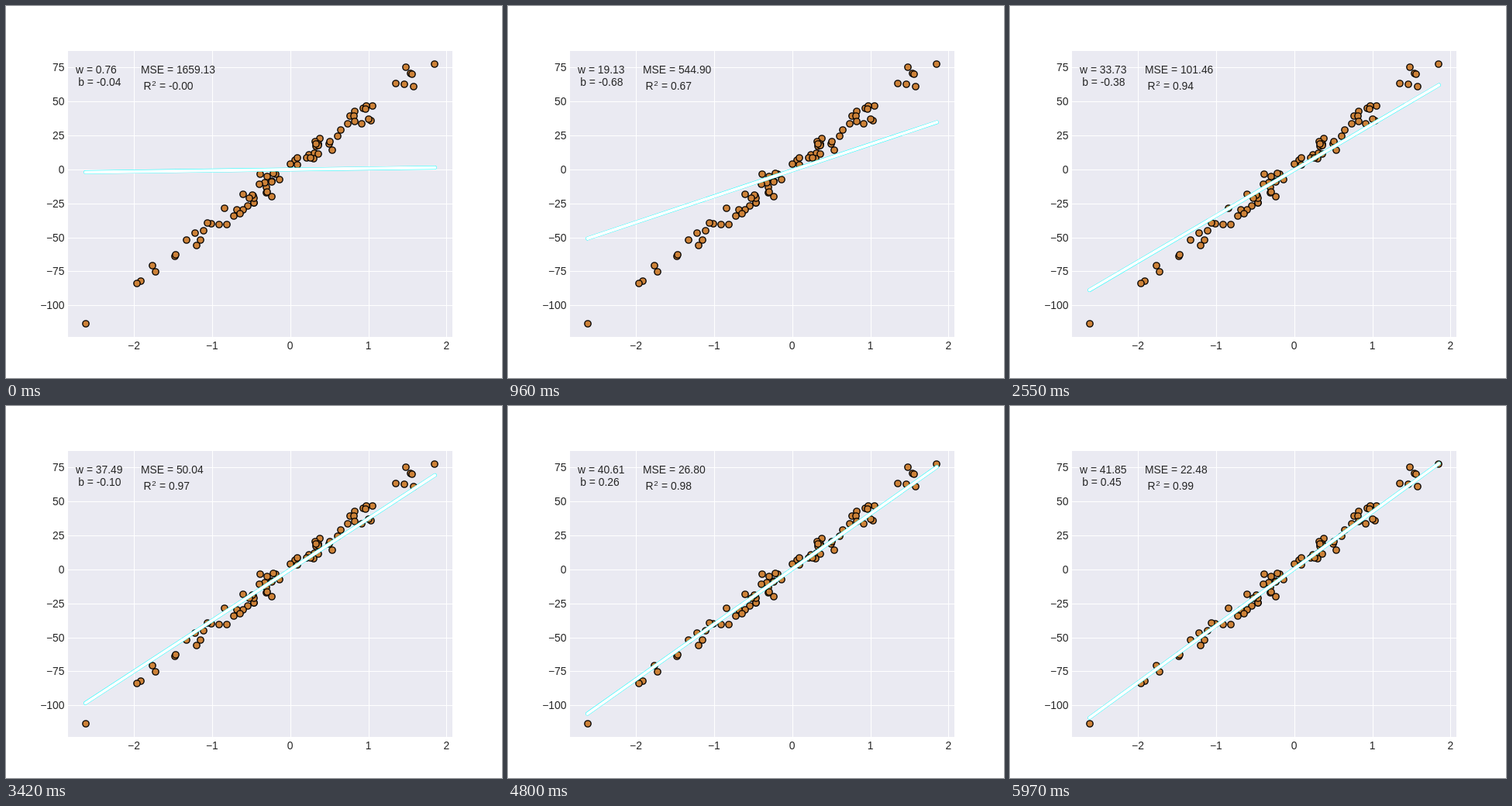
Animation of 640 by 480 pixels, one loop 6 s. Source, as an HTML page:

```html
<!DOCTYPE html>
<html lang="en">
<head>
<meta charset="utf-8">
<title>Linear regression by gradient descent</title>
<style>
  html, body { margin: 0; width: 100%; height: 100%; overflow: hidden; background: #fff; }
  svg { display: block; width: 640px; height: 480px; }
  text { font: 13.89px "Liberation Sans", Arial, sans-serif; fill: #262626; }
  #grid path { stroke: #fff; }
  #dots circle { fill: #cd8238; stroke: #000; stroke-width: 1.39; }
  .fit { stroke-linecap: round; }
</style>
</head>
<body>
<svg viewBox="0 0 640 480">
  <rect x="80" y="58" width="496" height="369" fill="#eaeaf2"/>
  <g id="grid"></g>
  <g id="dots"></g>
  <line class="fit" stroke="#0ff" stroke-width="4.8"/>
  <line class="fit" stroke="#fff" stroke-width="4"/>
  <text id="w" x="90" y="87"></text>
  <text id="b" x="93.2" y="103"></text>
  <text id="mse" x="174" y="87"></text>
  <text x="177.4" y="108">R</text>
  <text x="188.2" y="103" style="font-size:9.72px">2</text>
  <text id="r2" x="198" y="108"></text>
</svg>
<script>
const $ = id => document.getElementById(id);
const X = x => 366.69 + 100.83 * x;
const Y = y => 210.9 - 1.754 * y;
const crisp = v => Math.round(v) + 0.5;
const label = v => String(v).replace('-', '\u2212');

let grid = '';
for (let x = -2; x <= 2; x++)
  grid += `<path d="M${crisp(X(x))} 58V427"/><text x="${X(x)}" y="443" text-anchor="middle">${label(x)}</text>`;
for (let y = -100; y <= 75; y += 25)
  grid += `<path d="M80 ${crisp(Y(y))}H576"/><text x="75.5" y="${Math.round(Y(y) + 5)}" text-anchor="end">${label(y)}</text>`;
$('grid').innerHTML = grid;

// Mersenne Twister, returning uniform numbers in [0, 1)
function twister(seed) {
  const N = 624, s = new Uint32Array(N);
  s[0] = seed;
  for (let i = 1; i < N; i++)
    s[i] = Math.imul(1812433253, s[i - 1] ^ (s[i - 1] >>> 30)) + i;
  let at = 0;
  function word() {
    const next = (at + 1) % N;
    const mix = (s[at] & 0x80000000) | (s[next] & 0x7fffffff);
    let y = s[at] = s[(at + 397) % N] ^ (mix >>> 1) ^ (mix & 1 ? 0x9908b0df : 0);
    at = next;
    y ^= y >>> 11;
    y ^= (y << 7) & 0x9d2c5680;
    y ^= (y << 15) & 0xefc60000;
    return (y ^ (y >>> 18)) >>> 0;
  }
  return () => {
    const high = word() >>> 5, low = word() >>> 6;
    return (high * 2 ** 26 + low) / 2 ** 53;
  };
}

// Normal deviates in pairs, by the polar method
function normals(count, random) {
  const out = [];
  while (out.length < count) {
    const u = 2 * random() - 1, v = 2 * random() - 1, r = u * u + v * v;
    if (r >= 1 || r === 0) continue;
    const f = Math.sqrt(-2 * Math.log(r) / r);
    out.push(f * v, f * u);
  }
  return out;
}

const random = twister(42);
const xs = normals(100, random);
const slope = 100 * random();
const noise = normals(100, random);
const heldOut = new Set([3, 15, 19, 21, 23, 25, 32, 39, 41, 42, 48, 66, 72, 76, 79, 85, 88, 92]);

let dots = '';
xs.forEach((x, i) => {
  if (heldOut.has(i)) return;
  const y = slope * x + 5 * noise[i];
  dots += `<circle cx="${Math.round(X(x))}" cy="${Math.round(Y(y))}" r="4.17"/>`;
});
$('dots').innerHTML = dots;

// Gradient descent from w = b = 0 on the moments of the data
const bestW = 43.1174, bestB = 0.733, minMSE = 20.987;
const meanXX = 0.88312, meanX = -0.0667, varY = 1654.54, rate = 0.02;
const steps = [];
let dw = bestW, db = bestB;
for (let i = 0; i < 200; i++) {
  const mse = minMSE + meanXX * dw * dw + 2 * meanX * dw * db + db * db;
  const gw = meanXX * dw + meanX * db, gb = meanX * dw + db;
  dw -= rate * gw;
  db -= rate * gb;
  steps.push({ w: bestW - dw, b: bestB - db, mse });
}

const fits = document.querySelectorAll('.fit');
const ends = [Math.min(...xs), Math.max(...xs)];

function draw(now) {
  const { w, b, mse } = steps[Math.floor(now % 6000 / 30)];
  for (const line of fits)
    ends.forEach((x, i) => {
      line.setAttribute('x' + (i + 1), X(x));
      line.setAttribute('y' + (i + 1), Y(w * x + b));
    });
  $('w').textContent = 'w = ' + w.toFixed(2);
  $('b').textContent = 'b = ' + b.toFixed(2);
  $('mse').textContent = 'MSE = ' + mse.toFixed(2);
  $('r2').textContent = '= ' + (1 - mse / varY).toFixed(2);
}

const start = performance.now();
function tick() {
  draw(performance.now() - start);
  requestAnimationFrame(tick);
}
tick();
</script>
</body>
</html>
```
